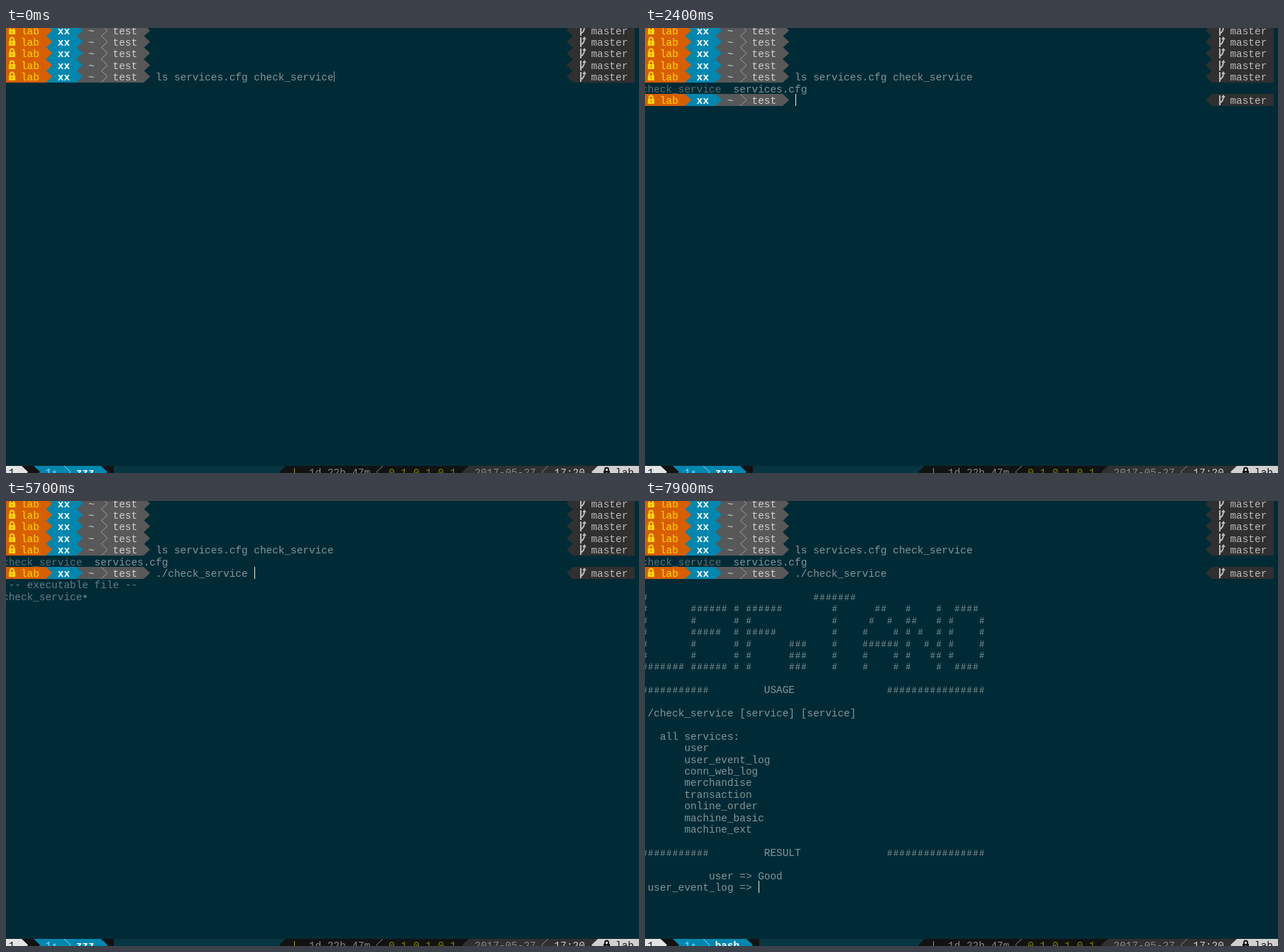
Animation of 892 by 628 pixels, one loop 8000 ms. Source, as an HTML page with a canvas:

```html
<!DOCTYPE html>
<html lang="en">
<head>
<meta charset="utf-8">
<title>Terminal session</title>
<style>
html, body { margin: 0; width: 892px; height: 628px; overflow: hidden; background: #002b36; }
canvas { display: block; }
</style>
</head>
<body>
<canvas id="screen" width="892" height="628"></canvas>
<script>
const ctx = document.getElementById('screen').getContext('2d');
const LOOP = 8000, H = 17;
const BG = '#002b36', TEXT = '#839496', DIM = '#586e75', BLUE = '#0087af',
      BLACK = '#121212', DARK = '#303030', GRAY = '#585858', LIGHT = '#d0d0d0';

const rowTop = row => Math.floor(-4.9 + 16.41 * row);
const edge = col => Math.round(-3.8 + 8.635 * col);

// Symbols that are smaller or lower than the letters.
const SYMBOLS = { '#': { size: 12, dx: 0.7, dy: 0 }, '*': { size: 14.4, dx: 0, dy: 3 } };
const LETTER = { size: 14.4, dx: 0, dy: 0 };

// Each character sits in its own terminal cell.
function text(col, row, str, color = TEXT, weight = '') {
  ctx.fillStyle = color;
  [...str].forEach((ch, i) => {
    if (ch === ' ') return;
    const { size, dx, dy } = SYMBOLS[ch] || LETTER;
    ctx.font = `${weight} ${size}px "Liberation Mono", monospace`;
    ctx.fillText(ch, -5 + 8.64 * (col + i) + dx, rowTop(row) + 14 + dy);
  });
}

function rect(x, y, w, h, color) {
  ctx.fillStyle = color;
  ctx.fillRect(x, y, w, h);
}

function band(x1, x2, row, color) {
  rect(x1, rowTop(row), x2 - x1, H, color);
}

// Powerline separator; dir 1 points right, -1 points left.
function wedge(x, row, color, dir = 1, filled = true) {
  const y = rowTop(row), base = dir > 0 ? x : x + 9, tip = dir > 0 ? x + 9 : x;
  ctx.beginPath();
  ctx.moveTo(base, y);
  ctx.lineTo(tip, y + H / 2);
  ctx.lineTo(base, y + H);
  if (filled) {
    ctx.fillStyle = color;
    ctx.fill();
  } else {
    ctx.strokeStyle = color;
    ctx.lineWidth = 1;
    ctx.stroke();
  }
}

function lock(x, row, color, hole) {
  const y = rowTop(row);
  ctx.strokeStyle = color;
  ctx.lineWidth = 2;
  ctx.beginPath();
  ctx.moveTo(x + 2, y + 8);
  ctx.lineTo(x + 2, y + 5);
  ctx.arc(x + 4.5, y + 5, 2.5, Math.PI, 0);
  ctx.lineTo(x + 7, y + 8);
  ctx.stroke();
  rect(x, y + 7, 9, 7, color);
  rect(x + 4, y + 9, 1, 3, hole);
}

function branch(row) {
  const y = rowTop(row);
  ctx.strokeStyle = ctx.fillStyle = '#bcbcbc';
  ctx.lineWidth = 2;
  ctx.beginPath();
  ctx.moveTo(810, y + 2);
  ctx.lineTo(810, y + 16);
  ctx.moveTo(810, y + 13);
  ctx.quadraticCurveTo(815, y + 10, 815, y + 4);
  ctx.stroke();
  ctx.beginPath();
  ctx.moveTo(812, y + 5);
  ctx.lineTo(815, y + 1);
  ctx.lineTo(818, y + 5);
  ctx.fill();
}

function prompt(row) {
  band(0, 56, row, '#d75f00');
  band(56, 99, row, BLUE);
  band(99, 194, row, GRAY);
  wedge(56, row, '#d75f00');
  wedge(99, row, BLUE);
  wedge(194, row, GRAY);
  wedge(134, row, '#9e9e9e', 1, false);
  lock(4, row, '#ffd700', '#d75f00');
  text(3, row, 'lab', '#ffd700');
  text(9, row, 'xx', '#fff', 'bold');
  text(14, row, '~', LIGHT);
  text(18, row, 'test', LIGHT);
  wedge(790, row, DARK, -1);
  band(799, 886, row, DARK);
  branch(row);
  text(96, row, 'master', '#bcbcbc');
}

function statusBar(job) {
  const row = 38, end = edge(13 + job.length);
  band(0, 892, row, '#073642');
  band(0, 22, row, '#e4e4e4');
  band(22, end + 18, row, BLACK);
  wedge(22, row, '#e4e4e4');
  band(39, end, row, BLUE);
  wedge(39, row, BLACK);
  wedge(end, row, BLUE);
  text(1, row, '1', BLACK);
  text(7, row, '1*', '#87d7ff');
  wedge(82, row, '#87d7ff', 1, false);
  text(12, row, job, '#fff', 'bold');

  wedge(385, row, BLACK, -1);
  band(394, 652, row, BLACK);
  rect(406, 621, 1, 7, '#b09a50');
  text(50, row, '1d 22h 47m', '#8a8a8a');
  wedge(522, row, '#8a8a8a', -1, false);
  text(63, row, '0.1 0.1 0.1', '#7c8500');
  wedge(643, row, DARK, -1);
  band(652, 834, row, DARK);
  text(77, row, '2017-05-27', '#8a8a8a');
  wedge(755, row, '#8a8a8a', -1, false);
  text(90, row, '17:20', LIGHT);
  wedge(825, row, LIGHT, -1);
  band(834, 892, row, LIGHT);
  lock(842, row, BLACK, LIGHT);
  text(100, row, 'lab', BLACK);
}

// Banner letters: start column, then seven lines.
const BANNER = [
  [0, '#/#/#/#/#/#/#######'],
  [8, '/######/#/#####/#/#/######'],
  [15, '/#/#/#/#/#/#'],
  [17, '/######/#/#####/#/#/#'],
  [24, '////###/###/###'],
  [28, '#######/   #/   #/   #/   #/   #/   #'],
  [36, '/  ##/ #  #/#    #/######/#    #/#    #'],
  [43, '/#    #/##   #/# #  #/#  # #/#   ##/#    #'],
  [50, '/ ####/#    #/#    #/#    #/#    #/ ####']
];
const SERVICES = ['user', 'user_event_log', 'conn_web_log', 'merchandise',
  'transaction', 'online_order', 'machine_basic', 'machine_ext'];

function heading(row, title) {
  text(0, row, '#'.repeat(11));
  text(20, row, title);
  text(40, row, '#'.repeat(16));
}

function report(t) {
  for (const [col, art] of BANNER)
    art.split('/').forEach((line, i) => text(col, 8 + i, line));
  heading(16, 'USAGE');
  text(0, 18, './check_service [service] [service]');
  text(3, 20, 'all services:');
  SERVICES.forEach((name, i) => text(7, 21 + i, name));
  heading(30, 'RESULT');
  text(11, 32, 'user =>');
  if (t >= 6800) text(19, 32, 'Good');
  if (t >= 7000) text(1, 33, 'user_event_log =>');
}

const COMMAND = './check_service ';
const KEYS = [3600, 3800, 3900, 4100, 4200, 4300, 4400];
const HIDDEN = [[1000, 1500], [2000, 2400], [2800, 3300], [5200, 5700], [6500, 7000], [7400, 7900]];

function cursor(t, typed) {
  if (HIDDEN.some(([from, to]) => t >= from && t < to)) return;
  const [col, row] = t < 2300 ? [54, 4] : t < 6000 ? [25 + typed, 6] : [19, t < 7000 ? 32 : 33];
  const x = Math.floor(-3.55 + 8.635 * col), y = rowTop(row);
  if (t < 1000) rect(x, y + 1, 1, 15, TEXT);
  else rect(x, y, 1, H, '#eee8d5');
}

function draw(t) {
  const typed = t >= 4800 ? COMMAND.length : KEYS.filter(k => t >= k).length;
  rect(0, 0, 892, 628, BG);
  for (let row = 0; row < 5; row++) prompt(row);
  text(25, 4, 'ls services.cfg check_service');
  if (t >= 2300) {
    text(0, 5, 'check_service', DIM);
    text(15, 5, 'services.cfg');
  }
  if (t >= 2400) {
    prompt(6);
    text(25, 6, COMMAND.slice(0, typed));
  }
  if (t >= 4800 && t < 6000) {
    text(1, 7, '-- executable file --', '#657b83');
    text(0, 8, 'check_service', '#657b83');
    text(13, 8, '*');
  }
  if (t >= 6000) report(t);
  statusBar(t < 6800 ? 'zzz' : 'bash');
  cursor(t, typed);
}

const start = performance.now();
function tick() {
  draw((performance.now() - start) % LOOP);
  requestAnimationFrame(tick);
}
tick();
</script>
</body>
</html>
```
